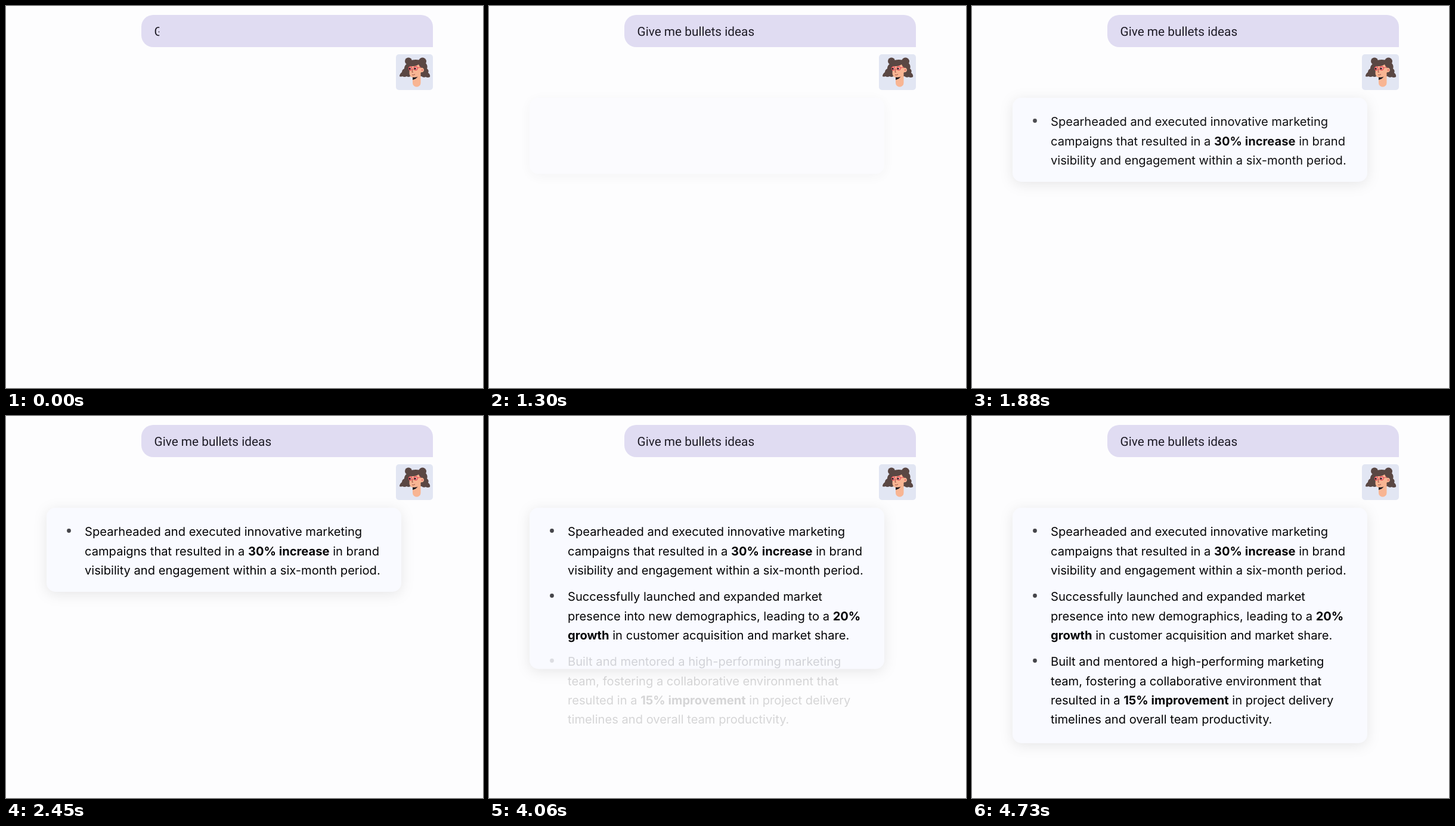
Write an HTML page that moves like this. It is 800x641 px and loops after 4760 ms.

```html
<!DOCTYPE html>
<html lang="en">
<head>
<meta charset="utf-8">
<title>Chat bullets</title>
<style>
  html, body { margin: 0; width: 100%; height: 100%; overflow: hidden; background: #fdfdfe; }
  svg { display: block; width: 100%; height: 100%; text-rendering: geometricPrecision; }
  #prompt { font: 20.8px Roboto, sans-serif; fill: #1e1c26; }
  #card { fill: #f9faff; filter: drop-shadow(0 4px 11px rgba(0, 0, 0, .09)); }
  .bullet { font: 20.14px Inter, sans-serif; fill: #050507; }
  .bullet circle { fill: #45454a; }
  .bold { font-weight: 700; }
</style>
</head>
<body>
<svg viewBox="0 0 800 641">
  <clipPath id="typed"><rect id="wipe" x="240" y="20" height="44"/></clipPath>
  <path fill="#e0dcf2" d="M247 15H696a20 20 0 0 1 20 20V69H247a20 20 0 0 1-20-20V35a20 20 0 0 1 20-20Z"/>
  <text id="prompt" x="248.5" y="49.5" clip-path="url(#typed)">Give me bullets ideas</text>

  <g id="avatar">
    <rect x="654" y="81" width="62" height="60" rx="5" fill="#e2e6f3"/>
    <g fill="#5a4743">
      <circle cx="675" cy="92.5" r="6"/>
      <circle cx="698.5" cy="93" r="6.5"/>
      <path d="M672 97Q677 90 687 90Q699 90 704 96Q708 100 706 105Q710 108 708 112Q712 115 711 119Q707 121 704 119Q700 121 697 118H678Q675 120 672 118Q668 120 665 118Q662 119 660 118Q660 114 664 111Q664 107 668 105Q668 100 672 97Z"/>
    </g>
    <path fill="#f8b593" d="M682 114H695.5V129a6.75 6.75 0 0 1-13.5 0Z"/>
    <path fill="#f8b593" d="M677 101Q686 102 692 98Q694 102 695.5 104A3.8 3.8 0 1 1 696 111Q695 118 689 120Q677 122 676.5 113Z"/>
    <path fill="#17131a" d="M682 119.5Q687 120.5 690.5 118.5Q688 122.5 682 124Z"/>
    <g fill="#f5a9a0" stroke="#e44f58" stroke-width="1.2">
      <circle cx="678.2" cy="105" r="2.8"/>
      <circle cx="687" cy="104.5" r="3.1"/>
      <path fill="none" d="M690 104L696 102.5"/>
    </g>
    <g fill="#221a20">
      <circle cx="677.2" cy="105.3" r="1.5"/>
      <circle cx="686" cy="105" r="1.6"/>
    </g>
    <path fill="none" stroke="#9b5146" d="M682.5 106L680.8 111H683M681 115.5Q684 116.5 686 114.5"/>
    <circle cx="698" cy="107.5" r="1.4" fill="#e87770"/>
  </g>

  <rect id="card" x="68" y="154" width="595" rx="15"/>
  <g id="bullets"></g>
</svg>
<script>
const LOOP = 4760;
const CARD_TOP = 154;
const LINE_OFFSETS = [0, 33, 65, 97];
const get = id => document.getElementById(id);

// Each bullet fades in over its own span while the card grows to its bottom edge.
const bullets = [
  { y: 201, fade: [1360, 600], grow: [1120, 400], bottom: 295, lines: [
    "Spearheaded and executed innovative marketing",
    "campaigns that resulted in a *30% increase* in brand",
    "visibility and engagement within a six-month period."] },
  { y: 310, fade: [3510, 400], grow: [3510, 390], bottom: 404, lines: [
    "Successfully launched and expanded market",
    "presence into new demographics, leading to a *20%*",
    "*growth* in customer acquisition and market share."] },
  { y: 419, fade: [3900, 640], grow: [3910, 640], bottom: 549, lines: [
    "Built and mentored a high-performing marketing",
    "team, fostering a collaborative environment that",
    "resulted in a *15% improvement* in project delivery",
    "timelines and overall team productivity."] }
];

const markBold = line => line.replace(/\*(.+?)\*/g, '<tspan class="bold">$1</tspan>');
get("bullets").innerHTML = bullets.map(({ y, lines }) => `<g class="bullet">
  <circle cx="105.5" cy="${y - 8.5}" r="3.4"/>
  ${lines.map((line, i) => `<text x="132" y="${y + LINE_OFFSETS[i]}">${markBold(line)}</text>`).join("")}
</g>`).join("");
const groups = document.querySelectorAll(".bullet");

function ease(time, [start, duration]) {
  const p = Math.min(1, Math.max(0, (time - start) / duration));
  return p * p * (3 - 2 * p);
}

function draw(time) {
  get("wipe").setAttribute("width", 17 + 195 * Math.min(1, time / 1030));
  let bottom = 272;
  bullets.forEach((bullet, i) => {
    groups[i].setAttribute("opacity", ease(time, bullet.fade));
    bottom += (bullet.bottom - bottom) * ease(time, bullet.grow);
  });
  const card = get("card");
  card.setAttribute("height", bottom - CARD_TOP);
  card.setAttribute("opacity", ease(time, bullets[0].grow));
}

const began = performance.now();
function tick() {
  draw((performance.now() - began) % LOOP);
  requestAnimationFrame(tick);
}
draw(0);
requestAnimationFrame(tick);
</script>
</body>
</html>
```
